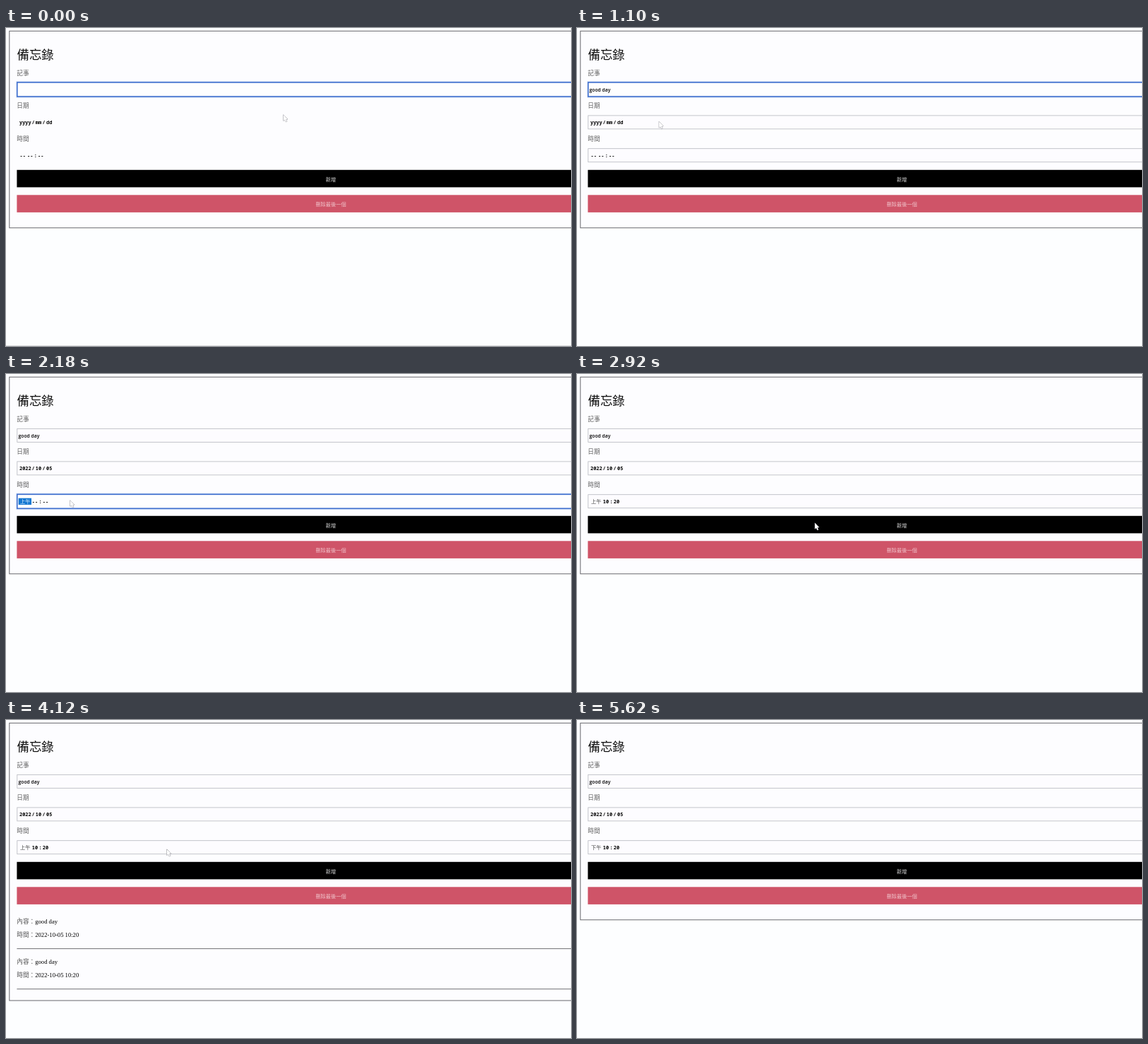
Recreate the animation shown at these times as an HTML page with a canvas. Size 800 by 450 pixels, loop 5720 ms.

```html
<!DOCTYPE html>
<html lang="zh-Hant">
<head>
<meta charset="utf-8">
<title>備忘錄</title>
<style>
html, body { margin: 0; width: 100%; height: 100%; overflow: hidden; background: #fdfeff; }
canvas { display: block; }
</style>
</head>
<body>
<canvas id="stage" width="800" height="450"></canvas>
<script>
const ctx = document.getElementById('stage').getContext('2d');
const LOOP = 5720;
const LEFT = 15.4;
const CJK = '"Noto Sans CJK TC", "Noto Sans CJK", sans-serif';
const SERIF = '"Liberation Serif", "Noto Sans CJK TC", "Noto Sans CJK", serif';
const UI = '"Open Sans", "Noto Sans", sans-serif';
const MONO = '"Noto Sans Mono", "DejaVu Sans Mono", monospace';

// Pointer stops: [time, x, y]
const pointerPath = [
  [0, 392, 123], [590, 392, 123], [700, 354, 128], [1120, 104, 133],
  [1330, 104, 133], [1500, 90, 179], [2580, 90, 179], [2880, 336, 211],
  [3760, 336, 211], [4200, 203, 177], [4500, 203, 177], [4640, 505, 214],
  [4680, 505, 214], [4720, 509, 225], [4820, 512, 246], [5440, 512, 246],
  [5600, 810, 120]
];

function text(str, x, y, size, color, family, weight = 400, align = 'left') {
  ctx.font = `${weight} ${size}px ${family}`;
  ctx.textAlign = align;
  ctx.fillStyle = color;
  ctx.fillText(str, x, y);
}

function rect(x, y, w, h, color) {
  ctx.fillStyle = color;
  ctx.fillRect(x, y, w, h);
}

function field(y, focused, visible = true) {
  if (focused) {
    rect(14.4, y - 1.8, 786, 23.6, '#cfddf6');
    rect(15, y - 0.8, 785, 21.6, '#3f6fce');
    rect(16.6, y + 0.8, 784, 18.4, '#fefeff');
  } else if (visible) {
    rect(LEFT, y, 785, 19.8, '#b6b8be');
    rect(LEFT + 0.8, y + 0.8, 785, 18.2, '#fdfcff');
  }
}

// Each part: [string, x]
function parts(list, y, highlighted) {
  list.forEach(([str, x], i) => {
    const lit = highlighted && i === 0;
    const cjk = /[上下]/.test(str);
    if (lit) rect(17.7, y - 7.3, str === '--' ? 11 : 18.3, 9.3, '#1578d2');
    text(str, x, y, cjk ? 7.2 : 6.9, lit ? '#e4f2ff' : cjk ? '#444' : '#000', cjk ? CJK : MONO, cjk ? 400 : 600);
  });
}

function drawDate(t) {
  const focused = t >= 1180 && t < 1780;
  field(123.5, focused, t >= 40);
  const [year, month, day] = t < 1320 ? ['yyyy', 'mm', 'dd'] : ['2022', '10', '05'];
  parts([[year, 19], ['/', 36.4], [month, 41.8], ['/', 51.6], [day, 57]], 136, focused);
}

function drawTime(t) {
  const focused = (t >= 1780 && t < 2900) || (t >= 4220 && t < 4660);
  field(170.3, focused, t >= 40);
  if (t < 2000) {
    parts([['--', 19.5], ['--', 30], [':', 39.8], ['--', 45]], 183, focused);
    return;
  }
  const half = t < 4390 ? '上午' : '下午';
  const hour = t < 2300 ? '--' : '10';
  const minute = t < 2460 ? '--' : '20';
  parts([[half, 20], [hour, 36.8], [':', 46.4], [minute, 51.8]], 183, focused && (t < 2220 || t > 4000));
}

function notesAt(t) {
  const list = [];
  if (t >= 2960) list.push('10:20');
  if (t >= 3220) list.push('10:20');
  if (t >= 4660) list.unshift('22:20');
  const removed = [4920, 5200, 5380].filter(at => t >= at).length;
  return list.slice(0, list.length - removed);
}

function drawNote(clock, y) {
  [['內容：', 'good day', 288.3], ['時間：', '2022-10-05 ' + clock, 307.2]].forEach(([label, value, base]) => {
    text(label, 15.3, y + base, 8.64, '#555', CJK, 300);
    text(value, 41.2, y + base, 8.64, '#000', SERIF);
  });
  rect(LEFT, y + 323.1, 785, 1, '#707075');
}

function drawPointer(t) {
  let i = 0;
  while (i < pointerPath.length - 2 && t >= pointerPath[i + 1][0]) i++;
  const [t0, x0, y0] = pointerPath[i], [t1, x1, y1] = pointerPath[i + 1];
  const k = Math.min(1, Math.max(0, (t - t0) / (t1 - t0)));
  ctx.save();
  ctx.translate(x0 + (x1 - x0) * k + 0.4, y0 + (y1 - y0) * k - 0.7);
  ctx.beginPath();
  ctx.moveTo(0.5, 0.5);
  [[0.5, 9], [2.4, 7.4], [3.9, 10.6], [5.3, 10], [3.9, 6.9], [6.4, 6.7]].forEach(p => ctx.lineTo(...p));
  ctx.closePath();
  ctx.fillStyle = '#fff';
  ctx.strokeStyle = '#77777f';
  ctx.lineWidth = 0.8;
  ctx.stroke();
  ctx.fill();
  ctx.restore();
}

function draw(t) {
  const notes = notesAt(t);
  const bottom = 282.3 + 57.1 * notes.length;
  const center = notes.length > 2 ? 455 : 460;

  rect(0, 0, 800, 450, '#fdfeff');
  rect(4.3, 3.8, 796, bottom - 2.8, '#66666c');
  rect(5.3, 4.8, 795, bottom - 4.8, '#fdfdff');
  if (t < 20) rect(0, 449, 800, 1, '#dddde0');

  text('備忘錄', 15.5, 44.3, 17.4, '#111', CJK, 300);
  [['記事', 66.5], ['日期', 113.4], ['時間', 160]].forEach(([label, y]) =>
    text(label, 15.3, y, 8.64, '#606060', CJK, 300));

  field(77, t < 1180);
  const typed = Math.floor(Math.max(0, t - 80) / 60);
  text('good day'.slice(0, typed), 17.5, 89.5, 6.8, '#000', UI, 600);
  drawDate(t);
  drawTime(t);

  rect(LEFT, 200.8, 785, 24.6, '#000');
  text('新增', center, 216.7, 7.2, '#d8d8d8', CJK, 300, 'center');
  rect(LEFT, 236.3, 785, 24.6, '#cf5468');
  text('刪除最後一個', center, 252.3, 7.2, '#f0c4cb', CJK, 300, 'center');

  notes.forEach((clock, i) => drawNote(clock, i * 57.1));
  drawPointer(t);
}

const start = performance.now();
function frame() {
  draw((performance.now() - start) % LOOP);
  requestAnimationFrame(frame);
}
frame();
</script>
</body>
</html>
```
